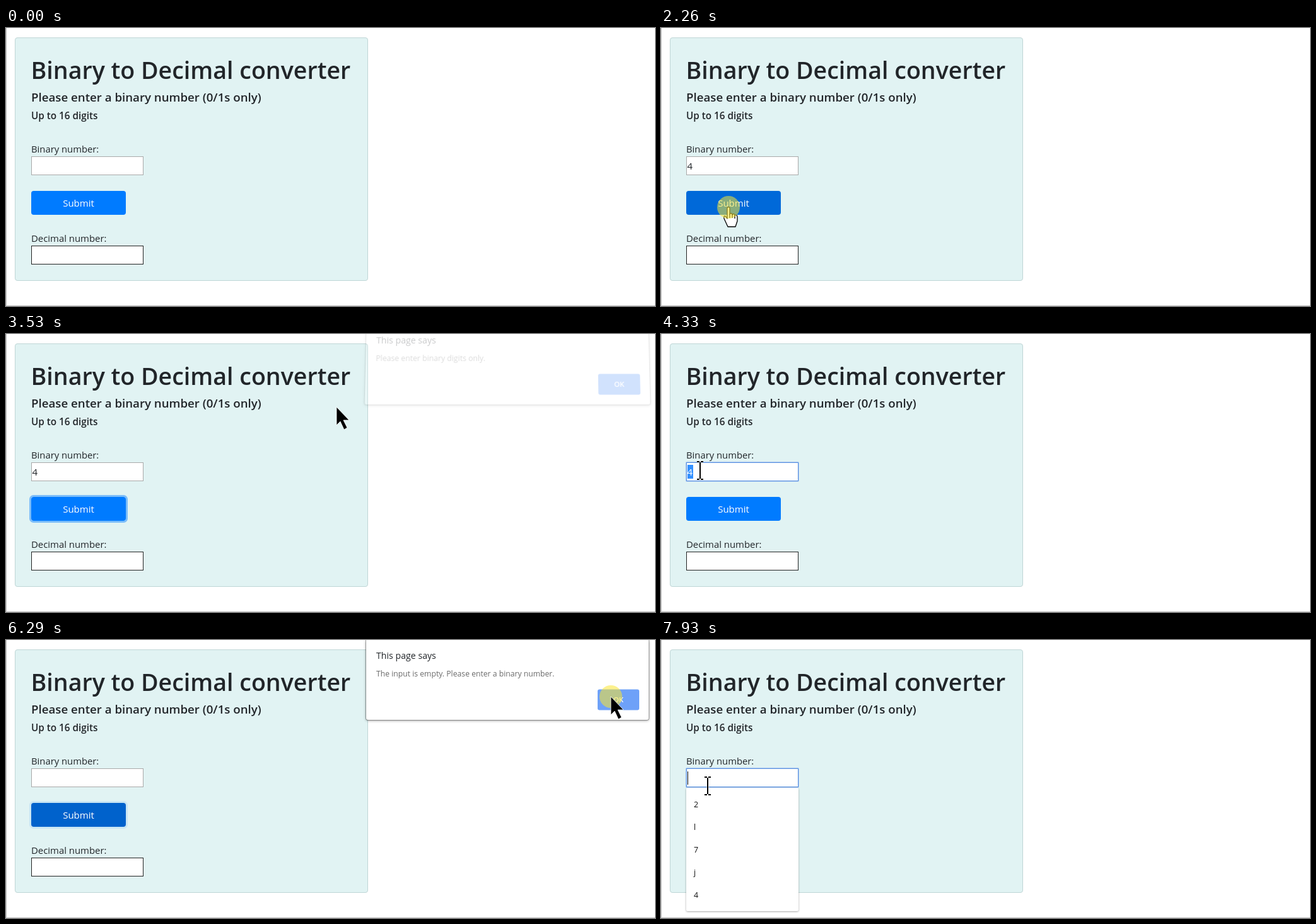
An HTML page that plays this animation: 1029 px wide and 442 px high, repeating every 8 s.

```html
<!DOCTYPE html>
<html lang="en">
<head>
<meta charset="utf-8">
<title>Binary to Decimal converter</title>
<style>
  html, body { margin: 0; width: 100%; height: 100%; overflow: hidden; background: #fff; }
  svg { position: absolute; left: 0; top: 0; display: block; overflow: visible; }
  text { font-family: "Open Sans", "Noto Sans", sans-serif; font-size: 15px; fill: #212529; white-space: pre; }
  .semi { font-weight: 600; }
  #menu rect { filter: drop-shadow(0 1px 1.5px rgba(0, 0, 0, .35)); }
  #menu text { font-size: 12.5px; fill: #111; }
  #dialog {
    position: absolute; left: 571px; top: 0; width: 448px; height: 127px;
    background: #fff; border-radius: 0 0 3px 3px;
    box-shadow: 0 0 0 1px rgba(0, 0, 0, .28), 0 1px 4px rgba(0, 0, 0, .45);
  }
</style>
</head>
<body>
<svg width="1029" height="442">
  <path d="M.5 0V441.5H1029" fill="none" stroke="#c4c4c4"/>
  <rect x="14.5" y="15.5" width="559" height="386" rx="3.5" fill="#e1f3f3" stroke="#bfd6d6"/>
  <text class="semi" x="39.5" y="81" style="font-size:37.6px">Binary to Decimal converter</text>
  <text class="semi" x="40" y="117" style="font-size:18.7px">Please enter a binary number (0/1s only)</text>
  <text class="semi" x="40" y="145" style="font-size:15.25px">Up to 16 digits</text>
  <text x="40" y="198" style="font-size:14.8px">Binary number:</text>
  <rect id="glow" x="39.5" y="203.5" width="179" height="31" rx="1" fill="none" stroke="#a5c4f0"/>
  <rect id="field" x="40.5" y="204.5" width="177" height="29" fill="#fff"/>
  <rect id="selection" x="42" y="208" width="9" height="22" fill="#3390ff"/>
  <text id="value" x="41.5" y="225">4</text>
  <path id="caret" d="M0 209V230" stroke="#000"/>
  <rect id="ring" x="38.5" y="257.5" width="153" height="41" rx="5" fill="none" stroke="#007bff" stroke-width="3"/>
  <rect id="button" x="40" y="259" width="150" height="38" rx="4"/>
  <text x="115" y="284" text-anchor="middle" style="fill:#fff">Submit</text>
  <text x="40" y="340" style="font-size:14.9px">Decimal number:</text>
  <rect x="40.5" y="346.5" width="177" height="29" fill="#fff" stroke="#222"/>
  <g id="menu">
    <rect x="40" y="235" width="178" height="196" rx="2" fill="#fff"/>
    <text x="52" y="266">2</text>
    <text x="52" y="302">l</text>
    <text x="52" y="338">7</text>
    <text x="52" y="374">j</text>
    <text x="52" y="410">4</text>
  </g>
</svg>

<div id="dialog">
  <svg width="448" height="127">
    <text x="16" y="30" style="font-size:14.15px">This page says</text>
    <text id="message" x="16" y="58" style="font-size:12.2px;fill:#6a6a6a"></text>
    <rect id="ok" x="367" y="78.5" width="66" height="33" rx="3"/>
    <text class="semi" x="400" y="99" text-anchor="middle" style="font-size:11.3px;fill:#fff">OK</text>
  </svg>
</div>

<svg width="1029" height="442">
  <g id="pointer">
    <g id="hand" fill="#fff" stroke="#000" stroke-width="1.3" stroke-linejoin="round">
      <path d="M-2 1Q0-2 2 1V11Q5 8 6 12 9 9 10 13 14 11 14 16V22L11 31H-1L-7 18Q-8 12-4 15L-2 18Z"/>
      <path d="M2 11V17M6 12V17M10 13V18" fill="none"/>
    </g>
    <circle id="click" r="18" fill="#fae632" fill-opacity=".55"/>
    <path id="arrow" d="M0 0V29L6 23 12 36 17 33 11 21H20Z" stroke="#fff" stroke-width=".8"/>
    <g id="beam" fill="none">
      <path d="M-5-14H5M0-14V14M-5 14H5" stroke="#fff" stroke-width="4" opacity=".6"/>
      <path d="M-5-14H-1M1-14H5M0-13V13M-5 14H-1M1 14H5" stroke="#000" stroke-width="2"/>
    </g>
  </g>
</svg>

<script>
const LOOP = 8000, STEP = 78;
const el = id => document.getElementById(id);
const during = (t, ...spans) => spans.some(([from, to]) => t >= from && t < to);
const show = (id, on) => el(id).style.display = on ? '' : 'none';
const paint = (id, attr, value) => el(id).setAttribute(attr, value);

// time, x, y, and whether the move that ends here is linear
const path = [
  [70, 473, 228], [640, 88, 212],
  [1780, 88, 212], [2100, 107, 285],
  [2440, 107, 285], [3050, 957, 90],
  [3340, 957, 90], [3530, 524, 116, true], [3870, 72, 206],
  [4000, 62, 217], [4740, 62, 217], [5040, 110, 276],
  [5430, 110, 276], [6050, 959, 90],
  [6400, 959, 90], [6880, 74, 232], [LOOP, 74, 232]
];
const clicks = [[690, 870], [2260, 2420], [3190, 3340], [4000, 4080], [4160, 4300],
  [5090, 5200], [6220, 6400], [6900, 7100]];
const dialogs = [
  { open: 2430, close: 3380, text: 'Please enter binary digits only.' },
  { open: 5200, close: 6400, text: 'The input is empty. Please enter a binary number.' }
];

function pointerAt(t) {
  const i = Math.max(1, path.findIndex(key => key[0] > t));
  const [t0, x0, y0] = path[i - 1], [t1, x1, y1, linear] = path[i];
  const s = Math.max(0, Math.floor((t - t0) / STEP) * STEP / (t1 - t0));
  const e = linear ? s : s * s * (3 - 2 * s);
  return [x0 + (x1 - x0) * e, y0 + (y1 - y0) * e];
}

function drawDialog(t) {
  const d = dialogs.find(d => t >= d.open && t < d.close + 200);
  show('dialog', d);
  if (!d) return;
  const k = Math.min(1, (t - d.open) / 150, 1 - (t - d.close) / 200);
  el('message').textContent = d.text;
  paint('ok', 'fill', during(t, [3190, 3340], [6220, 6400]) ? '#6ea1f8' : '#4285f4');
  el('dialog').style.opacity = k;
  el('dialog').style.transform = k < 1
    ? `perspective(800px) translateY(${-20 * (1 - k)}px) rotateX(${6.7 * (1 - k)}deg) scale(${1 + .005 * (1 - k)})`
    : 'none';
}

function drawForm(t, overButton) {
  const focused = during(t, [780, 2260], [4000, 5090], [6930, LOOP]);
  const selected = during(t, [4230, 4560]);
  show('glow', focused);
  paint('field', 'stroke', focused ? '#5b93e0' : '#a9a9a9');
  show('value', during(t, [1700, 4560]));
  show('selection', selected);
  el('value').style.fill = selected ? '#fff' : '';
  show('caret', during(t, [780, 1240], [1700, 2160], [4560, 5020], [7000, 7470], [7930, LOOP]));
  paint('caret', 'transform', `translate(${during(t, [1700, 2260]) ? 51.5 : 42.5})`);
  show('menu', during(t, [790, 1700], [7000, LOOP]));

  const pressed = during(t, [2340, 3400], [5180, 6420]);
  const ringed = during(t, [3400, 4000], [6420, 6930]);
  paint('button', 'fill', pressed ? '#0062cc' : overButton ? '#0069d9' : '#007bff');
  paint('ring', 'stroke-opacity', ringed ? .45 : pressed ? .1 : 0);
}

function drawPointer(t, x, y, overButton) {
  const overField = x >= 40 && x < 218 && y >= 204 && y < 235;
  show('pointer', t >= 70);
  paint('pointer', 'transform', `translate(${Math.round(x)} ${Math.round(y)})`);
  show('hand', overButton);
  show('beam', overField);
  show('arrow', !overButton && !overField);
  show('click', during(t, ...clicks));
}

function frame(now) {
  const t = now % LOOP;
  const [x, y] = pointerAt(t);
  const overButton = x >= 40 && x < 190 && y >= 259 && y < 297;
  drawForm(t, overButton);
  drawDialog(t);
  drawPointer(t, x, y, overButton);
  requestAnimationFrame(() => frame(performance.now() - start));
}
const start = performance.now();
frame(0);
</script>
</body>
</html>
```
